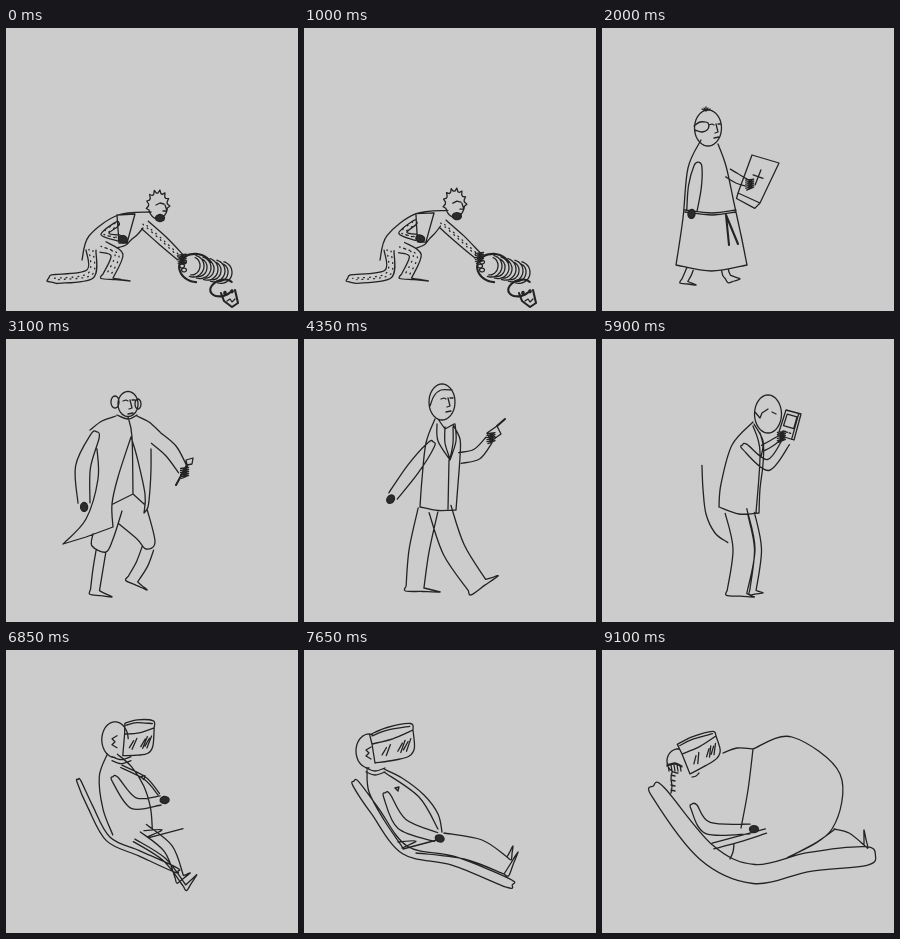
An HTML page that plays this animation: 292 px wide and 283 px high, repeating every 9150 ms.

```html
<!DOCTYPE html>
<html lang="en">
<head>
<meta charset="utf-8">
<title>Progress</title>
<style>
html, body { margin: 0; width: 100%; height: 100%; overflow: hidden; background: #cccccc; }
svg { display: block; width: 100vw; height: 100vh; }
path { fill: none; stroke: #232323; stroke-width: 1.3; stroke-linecap: round; stroke-linejoin: round; }
#thick { stroke-width: 2.1; }
#dots { stroke-dasharray: .8 5; }
#solid { fill: #2b2b2b; }
</style>
</head>
<body>
<svg viewBox="0 0 292 283">
  <path id="thin"/><path id="thick"/><path id="dots"/><path id="solid"/>
</svg>
<script>
const LOOP = 9150, STEP = 50, TAU = Math.PI * 2;
const layers = ['thin', 'thick', 'dots', 'solid'];
const out = {};
let shift = [0, 0];

// Geometry
const lerp = (a, b, u) =>
  typeof a === 'number' && typeof b === 'number' ? a + (b - a) * u
  : Array.isArray(a) && Array.isArray(b) ? a.map((v, i) => lerp(v, b[i], u))
  : u < .5 ? a : b;
const pairs = f => Array.from({ length: f.length >> 1 }, (_, i) => [f[2 * i], f[2 * i + 1]]);
const along = (p, d, k) => [p[0] + d[0] * k, p[1] + d[1] * k];
const unit = (a, b) => {
  const l = Math.hypot(b[0] - a[0], b[1] - a[1]) || 1;
  return [(b[0] - a[0]) / l, (b[1] - a[1]) / l];
};
const dist = (a, b) => Math.hypot(a[0] - b[0], a[1] - b[1]);
const last = f => f.slice(-2);

// Drawing
const xy = p => (p[0] + shift[0]).toFixed(1) + ' ' + (p[1] + shift[1]).toFixed(1);
function poly(p, layer = 'thin', closed) {
  out[layer] += 'M' + p.map(xy).join('L') + (closed ? 'Z' : '');
}
function curve(p, layer = 'thin', closed) {
  const n = p.length;
  const at = i => closed ? p[(i + n) % n] : p[Math.max(0, Math.min(n - 1, i))];
  let d = 'M' + xy(p[0]);
  for (let i = 0; i < (closed ? n : n - 1); i++) {
    const [a, b, c, e] = [-1, 0, 1, 2].map(k => at(i + k));
    d += 'C' + [lerp(b, along(b, [c[0] - a[0], c[1] - a[1]], 1), 1 / 6),
      lerp(c, along(c, [b[0] - e[0], b[1] - e[1]], 1), 1 / 6), c].map(xy).join(' ');
  }
  out[layer] += d;
}
const line = (...f) => curve(pairs(f));
const sharp = (...f) => poly(pairs(f));
function arc(x, y, rx, ry, from, to, layer, tilt = 0) {
  const c = Math.cos(tilt), s = Math.sin(tilt);
  curve(Array.from({ length: 13 }, (_, i) => {
    const a = from + (to - from) * i / 12, u = rx * Math.cos(a), v = ry * Math.sin(a);
    return [x + u * c - v * s, y + u * s + v * c];
  }), layer);
}
const oval = (x, y, rx, ry, layer, tilt) => arc(x, y, rx, ry, 0, TAU, layer, tilt);

// A tube around joints; the last number is its width
function limb(f, taper, caps = '') {
  const w = f[f.length - 1], c = pairs(f), n = c.length;
  const dir = c.map((_, i) => unit(c[Math.max(0, i - 1)], c[Math.min(n - 1, i + 1)]));
  const side = s => c.map((p, i) =>
    along(p, [-dir[i][1], dir[i][0]], s * w * (taper[i] ?? 1) / 2));
  const a = side(1), b = side(-1);
  const ends = [a[n - 1], b[n - 1]], d = dir[n - 1];
  if (!caps) { curve(a); curve(b); }
  else {
    const tip = caps === 'both' ? [along(c[n - 1], d, w / 2)] : [];
    curve([...a.slice().reverse(), along(c[0], dir[0], -w * taper[0] / 2), ...b, ...tip],
      'thin', caps === 'both');
  }
  return { ends, d, tip: c[n - 1] };
}
function leg(f, toe) {
  const { ends, d } = limb(f, [1, 1, .9]);
  const [heel, instep] = dist(ends[0], toe) > dist(ends[1], toe) ? ends : [ends[1], ends[0]];
  const sole = along(heel, d, 5);
  curve([heel, sole, lerp(sole, toe, .5), toe, lerp(toe, instep, .5), instep]);
}
function grip([x, y]) {
  for (let k = 0; k < 5; k++) sharp(x - 4, y - 4 + 2 * k, x + 4, y - 5 + 2 * k, x - 3, y - 2 + 2 * k);
}
// Position inside the held item, u across and v down
const inside = f => {
  const [a, b, c, d] = pairs(f);
  return (u, v) => lerp(lerp(a, b, u), lerp(d, c, u), v);
};

// Shared details
function face(x, y, d) {
  sharp(x + d - 7, y - 3, x + d - 4, y - 4, x + d - 2, y - 3);
  sharp(x + d + 2, y - 4, x + d + 5, y - 4);
  sharp(x + d, y - 4, x + d + 2, y + 4, x + d - 1, y + 5);
  sharp(x + d - 2, y + 10, x + d + 3, y + 9);
}
function hem(p, sag) {
  const a = last(p.back), b = last(p.front), m = lerp(a, b, .5);
  curve([a, [m[0], m[1] + sag], b]);
}
function skeleton() {
  arc(190, 240, 17, 14, 1.4, 5.6, 'thick', .2);
  for (let i = 0; i < 5; i++) {
    const x = 187 + i * 7, y = 238 + i * 1.6;
    arc(x, y, 11, 11, -1.5, 1.7, 'thin', .2);
    arc(x - 1, y, 8, 9, -1.4, 1.5, 'thin', .2);
  }
  for (let k = 0; k < 4; k++) oval(176 + k % 2 * 2, 230 + k * 4, 2.5, 1.8);
  arc(216, 260, 12, 8, .9, 5.9, 'thick', -.3);
  poly([[215, 265], [218, 273], [226, 279], [232, 275], [229, 262]], 'thick');
  for (const x of [219, 226]) oval(x, 265 - (x - 219) / 4, 1.2, 1.5, 'solid');
  sharp(221, 273, 224, 271, 226, 274, 229, 271);
}
function visor(at) {
  poly([at(0, 1), at(0, 0)]);
  curve([at(0, 0), at(.5, .08), at(1, 0)]);
  curve([at(1, 0), at(1, .7), at(.85, .97), at(.5, 1.02), at(0, 1)]);
  poly([at(0, 0), at(-.02, -.5)]);
  curve([at(-.02, -.5), at(.4, -.5), at(.95, -.28), at(1, 0)]);
  curve([at(.03, -.4), at(.4, -.38), at(.93, -.18)]);
  for (let k = 0; k < 6; k++) {
    const u = k < 2 ? .2 + k * .1 : .45 + k * .07, h = k % 2 ? .2 : .12;
    poly([at(u, .55 + h), at(u + .13, .5 - h)]);
  }
}
const frame = at => poly([at(0, 0), at(1, 0), at(1, 1), at(0, 1)], 'thin', true);

// head: x, y, rx, ry, shagginess, outline span; limbs: three joints and a width
const ape = {
  head: [152, 178, 9.5, 13, .25, TAU],
  back: [145, 184, 112, 187, 83, 208, 76, 232],
  front: [137, 200, 131, 207, 125, 212, 120, 217, 111, 220],
  armL: [111, 196, 99, 206, 113, 210, 8], armR: [139, 197, 157, 213, 174, 229, 10],
  legL: [85, 222, 84, 246, 50, 251, 10], legR: [97, 219, 111, 227, 102, 248, 12],
  toes: [41, 253, 124, 253], item: [111, 187, 129, 186, 121, 215, 113, 215], hands: 'LR',
  wear() {
    sharp(150, 177, 154, 175, 158, 176);
    sharp(159, 177, 161, 183, 157, 183);
    oval(154, 190, 4.5, 3.5, 'solid');
  },
  gear(p, at) {
    frame(at);
    for (const f of [p.armL, p.armR, p.legL, p.legR])
      for (const k of [-2, 2]) curve(pairs(f).map(q => [q[0] + k, q[1] + k / 3]), 'dots');
    skeleton();
  }
};
const monk = {
  head: [106, 100, 13.5, 18, 0, TAU],
  back: [99, 112, 86, 140, 81, 190, 74, 237],
  front: [116, 116, 124, 138, 132, 175, 139, 207, 145, 237],
  armL: [96, 138, 93, 158, 90, 182, 13], armR: [126, 145, 136, 151, 145, 155, 9],
  legL: [88, 241, 86, 246, 83, 252, 7], legR: [123, 242, 124, 246, 126, 249, 7],
  toes: [94, 257, 138, 251], item: [150, 127, 177, 135, 158, 175, 136, 165], hands: 'LR',
  wear(p) {
    hem(p, 6);
    face(106, 100, 8);
    line(92, 98, 98, 94, 106, 95, 106, 101, 100, 104, 93, 102);
    for (let k = -2; k <= 2; k++) sharp(104, 83, 104 + k * 2, 79 + Math.abs(k));
    for (const dy of [0, 2]) line(83, 182 + dy, 110, 185 + dy, 134, 182 + dy);
    poly([[124, 187], [127, 217]], 'thick');
    poly([[124, 187], [136, 216]], 'thick');
  },
  gear(p, at) {
    frame(at);
    poly([at(.5, .28), at(.52, .66)]);
    poly([at(.3, .45), at(.7, .45)]);
    poly([at(0, 1), at(.02, 1.14), at(.9, 1.16), at(1, 1)]);
  }
};
const gent = {
  head: [122, 65, 10, 12.5, 0, TAU],
  back: [91, 110, 92, 140, 80, 180, 57, 205],
  front: [145, 110, 145, 130, 144, 150, 142, 168, 138, 174],
  armL: [89, 97, 77, 128, 78, 164, 15], armR: [150, 99, 165, 112, 177, 131, 14],
  legL: [95, 212, 92, 230, 89, 251, 10], legR: [142, 209, 136, 225, 127, 240, 12],
  toes: [106, 258, 141, 251], item: [180, 121, 187, 119, 186, 125, 181, 126], hands: 'LR',
  wear() {
    face(122, 65, 2);
    oval(109, 63, 4, 6);
    oval(132, 65, 3, 5);
    line(110, 77, 96, 82, 84, 91);
    line(131, 77, 143, 83, 154, 93);
    line(111, 76, 122, 80, 131, 76);
    line(125, 98, 112, 138, 106, 165, 107, 188);
    line(125, 98, 131, 118, 139, 155, 138, 174);
    line(122, 78, 126, 98, 127, 155);
    sharp(57, 205, 80, 198, 107, 188);
    sharp(107, 165, 127, 155, 138, 165);
    line(87, 195, 86, 207, 100, 213, 107, 200, 116, 172);
    line(113, 185, 131, 200, 140, 210, 149, 203, 141, 170);
  },
  gear(p, at) {
    frame(at);
    poly([at(0, 1), [at(0, 1)[0] - 11, at(0, 1)[1] + 20]], 'thick');
  }
};
const clerk = {
  head: [138, 63, 13, 18, 0, TAU],
  back: [131, 80, 122, 104, 118, 140, 116, 168],
  front: [149, 86, 156, 100, 156, 118, 154, 145, 152, 171],
  armL: [127, 106, 109, 130, 89, 157, 13], armR: [156, 119, 173, 115, 185, 101, 11],
  legL: [124, 171, 115, 212, 111, 248, 20], legR: [136, 170, 150, 211, 173, 246, 23],
  toes: [136, 253, 194, 237], item: [183, 94, 193, 87, 197, 95, 187, 102], hands: 'LR',
  wear(p) {
    hem(p, 2);
    face(138, 63, 6);
    line(126, 67, 130, 57, 137, 51, 148, 51);
    sharp(145, 121, 144, 170);
    for (const s of [-1, 1]) {
      line(142 + 9 * s, 85, 143 + 9 * s, 102, 146, 121);
      line(145 + 4 * s, 88, 145 + 4 * s, 104, 146, 120);
    }
    sharp(134, 80, 141, 90, 150, 85);
  },
  gear(p, at) {
    frame(at);
    poly([at(1, 0), along(at(1, 0), [8, -7], 1)], 'thick');
  }
};
const player = {
  head: [166, 75, 13.5, 19, 0, TAU],
  back: [151, 83, 130, 106, 119, 145, 117, 168],
  front: [152, 85, 161, 102, 161, 125, 158, 150, 157, 174],
  armL: [143, 108, 166, 126, 184, 103, 11], armR: [161, 109, 170, 104, 177, 99, 6],
  legL: [134, 172, 142, 210, 135, 253, 22], legR: [149, 174, 156, 210, 151, 251, 7],
  toes: [152, 258, 161, 254], item: [184, 71, 199, 75, 192, 101, 176, 96], hands: 'R',
  chair: [100, 128, 101, 150, 104, 175, 113, 194, 125, 203, 0],
  wear(p) {
    hem(p, 4);
    sharp(153, 73, 158, 79, 160, 74, 166, 70);
    sharp(170, 73, 174, 75);
    line(151, 87, 158, 113, 154, 174);
    line(158, 94, 161, 106, 159, 118);
  },
  gear(p, at) {
    frame(at);
    poly([at(.15, .14), at(.8, .14), at(.8, .6), at(.15, .6)], 'thin', true);
    poly([at(.85, 0), at(.85, 1)]);
    for (let k = 0; k < 3; k++) poly([at(.2 + k * .2, .8), at(.3 + k * .2, .8)]);
  }
};
const gamer = {
  head: [65, 101, 13, 17, 0, 3.4],
  back: [63, 120, 65, 142, 80, 170, 99, 198],
  front: [80, 119, 98, 128, 120, 145, 134, 164, 138, 182],
  armL: [83, 146, 98, 174, 132, 187, 12], armR: [80, 122, 115, 147, 134, 179, 0],
  legL: [140, 183, 178, 190, 203, 207, 0], legR: [112, 203, 160, 209, 200, 224, 0],
  toes: [209, 196, 214, 202], item: [68, 94, 109, 80, 111, 106, 71, 113], hands: 'L',
  chair: [52, 134, 71, 161, 101, 200, 150, 211, 204, 233, 9],
  wear() {
    for (const dy of [0, 4]) line(62, 118 + dy, 71, 121 + dy, 81, 118 + dy);
    sharp(67, 97, 62, 100, 65, 103, 62, 106, 67, 109);
    sharp(91, 138, 95, 137, 94, 141, 91, 138);
    line(94, 192, 112, 191, 98, 198);
    sharp(99, 199, 133, 190);
  },
  gear(p, at) { visor(at); }
};
const blob = {
  head: [76, 111, 11, 12, 0, 3.3],
  back: [70, 122, 69, 129, 70, 136, 69, 143],
  front: [151, 99, 190, 87, 238, 124, 230, 179, 185, 208],
  armL: [92, 157, 106, 178, 148, 179, 12], armR: [111, 196, 137, 189, 164, 181, 6],
  legL: [232, 179, 247, 183, 262, 195, 0], legR: [232, 180, 215, 192, 189, 206, 0],
  toes: [262, 180, 185, 208], item: [80, 104, 114, 86, 120, 106, 88, 124], hands: 'L',
  chair: [56, 142, 104, 202, 152, 224, 207, 212, 264, 206, 19],
  wear() {
    for (let k = 0; k < 5; k++) sharp(66 + k * 3, 115, 67 + k * 3, 121);
    for (const dy of [0, 1]) line(65, 116 - dy, 73, 114 - dy, 80, 117 - dy);
    for (let k = 0; k < 4; k++) sharp(69, 125 + k * 5, 73, 126 + k * 5);
    line(121, 103, 135, 98, 151, 99);
    line(151, 99, 146, 140, 139, 178);
    line(132, 194, 131, 202, 128, 209);
    line(90, 127, 94, 126, 97, 123);
  },
  gear(p, at) { visor(at); }
};

const keys = [[0, ape], [900, ape], [2000, monk], [3100, gent], [4350, clerk],
  [5900, player], [7650, gamer], [9100, blob]];

// Item flights: start, end, dx, dy, arm that follows, its share
const flights = [
  [100, 850, 8, -112, 'armL', 1],
  [1000, 1900, 72, -118, 'armR', .4],
  [2150, 2900, 36, -120, 'armR', .35],
  [3450, 4250, 92, -88, 'armR', .35]
];

function fly(p, t) {
  for (const [t0, t1, dx, dy, arm, share] of flights) {
    if (t <= t0 || t >= t1) continue;
    const k = Math.sin(Math.PI * (t - t0) / (t1 - t0)), d = [dx * k, dy * k];
    p.item = p.item.map((v, i) => v + d[i % 2]);
    p[arm] = p[arm].map((v, i) => i > 5 ? v : v + d[i % 2] * share * (i >> 1) / 2);
  }
}
function walk(p, x) {
  ['legL', 'legR'].forEach((name, j) => {
    const a = TAU * x + j * Math.PI, sx = 12 * (Math.sin(a) - Math.sin(j * Math.PI));
    const lift = -5 * Math.max(0, Math.sin(a));
    p[name] = p[name].map((v, i) => i > 5 ? v : v + (i % 2 ? lift : sx) * (i >> 1) / 2);
    p.toes[2 * j] += sx;
    p.toes[2 * j + 1] += lift;
  });
}
function drawHead([x, y, rx, ry, shag, span]) {
  const n = 40;
  poly(Array.from({ length: n + 1 }, (_, i) => {
    const a = TAU / 4 + span * i / n;
    const tuft = i > 8 && i < 32 && i % 3 === 0 ? 1 + shag : 1;
    return [x + rx * tuft * Math.cos(a), y + ry * tuft * Math.sin(a)];
  }));
}

function draw(t) {
  for (const id of layers) out[id] = '';
  let i = 0;
  while (i < keys.length - 2 && t >= keys[i + 1][0]) i++;
  const [t0, A] = keys[i], [t1, B] = keys[i + 1];
  const x = Math.min(1, (t - t0) / (t1 - t0)), u = x * x * (3 - 2 * x);
  const p = {};
  for (const k of new Set([...Object.keys(A), ...Object.keys(B)])) p[k] = lerp(A[k], B[k], u);
  fly(p, t);
  if (i > 1 && i < 5) walk(p, x);

  drawHead(p.head);
  curve(pairs(p.back));
  curve(pairs(p.front));
  const left = limb(p.armL, [.6, 1, .8], 'start');
  const right = limb(p.armR, [1, 1, .75]);
  leg(p.legL, p.toes.slice(0, 2));
  leg(p.legR, p.toes.slice(2));
  if (p.hands.includes('L')) {
    const [hx, hy] = along(left.tip, left.d, 4);
    oval(hx, hy, 4.5, 3.5, 'solid', Math.atan2(left.d[1], left.d[0]));
  }
  if (p.hands.includes('R')) grip(along(right.tip, right.d, 3));
  if (p.chair) limb(p.chair, [.8], 'both');
  p.gear(p, inside(p.item));

  // Clothes follow the head
  const own = u < .5 ? A : B;
  shift = [p.head[0] - own.head[0], p.head[1] - own.head[1]];
  own.wear({ back: own.back, front: own.front });
  shift = [0, 0];
  for (const id of layers) document.getElementById(id).setAttribute('d', out[id]);
}

const start = performance.now();
function tick() {
  draw(Math.floor((performance.now() - start) % LOOP / STEP) * STEP);
  requestAnimationFrame(tick);
}
tick();
</script>
</body>
</html>
```
